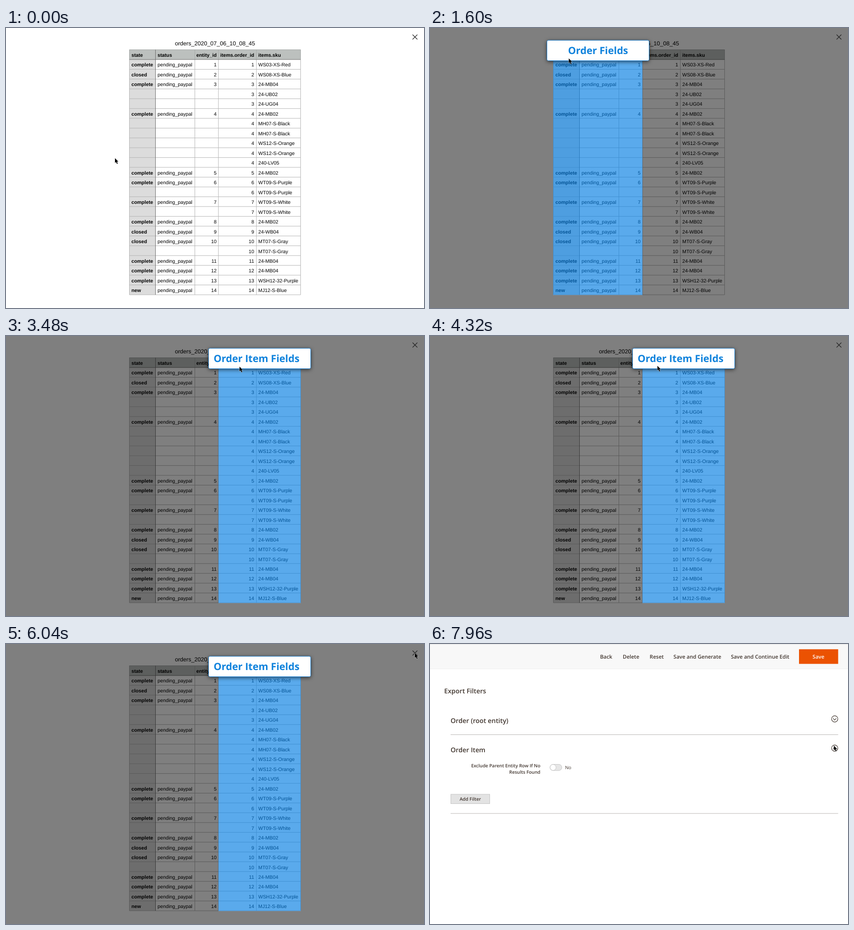
Recreate the animation shown at these times as an HTML page. Size 913 px wide and 613 px high, loop 8000 ms.

```html
<!DOCTYPE html>
<html lang="en">
<head>
<meta charset="utf-8">
<title>Order export</title>
<style>
html, body { margin: 0; width: 100%; height: 100%; overflow: hidden; background: #fff; }
svg { display: block; width: 913px; height: 613px; text-rendering: geometricPrecision; }
#table { font: 10.75px "Liberation Sans", Arial, sans-serif; fill: #000; }
#page { font: 600 11.5px "Open Sans", sans-serif; fill: #41362f; }
#labels { font: 700 21.7px "Open Sans", sans-serif; fill: #0f82dc; }
.b { font-weight: 700; }
.e { text-anchor: end; }
.m { text-anchor: middle; }
.h { font-size: 14.3px; }
.s { font-size: 10px; }
.line { fill: none; stroke: #b5b5b5; }
</style>
</head>
<body>
<svg viewBox="0 0 913 613">
  <g id="table"></g>
  <g id="labels"></g>
  <g id="page"></g>
  <g id="cursor">
    <path d="M0 0V10.3L2.4 8.2L4.2 12.5L6.1 11.7L4.3 7.5H7.4Z" fill="#000" stroke="#fff" stroke-width=".8" style="paint-order:stroke"/>
  </g>
</svg>
<script>
const $ = id => document.getElementById(id);
const text = (x, y, s, cls = '') => `<text x="${x}" y="${y}" class="${cls}">${s}</text>`;
const rect = (x, y, w, h, fill, more = '') =>
  `<rect x="${x}" y="${y}" width="${w}" height="${h}" fill="${fill}" ${more}/>`;
const path = (d, more) => `<path d="${d}" fill="none" ${more}/>`;

// Orders: state initial, then the item SKUs of each order
const orders = `c WS03-XS-Red|x WS08-XS-Blue|c 24-MB04 24-UB02 24-UG04
|c 24-MB02 MH07-S-Black MH07-S-Black WS12-S-Orange WS12-S-Orange 240-LV05
|c 24-MB02|c WT09-S-Purple WT09-S-Purple|c WT09-S-White WT09-S-White|c 24-MB02
|x 24-WB04|x MT07-S-Gray MT07-S-Gray|c 24-MB04|c 24-MB04|c WSH12-32-Purple|n MJ12-S-Blue`;
const states = { c: 'complete', x: 'closed', n: 'new' };
const cols = [269.5, 326.5, 412.5, 464, 547, 643.5];
const top0 = 69, rowH = 21.46, bottom = 584;

function drawTable() {
  let out = text(456.5, 38, 'orders_2020_07_06_10_08_45', 'm" style="font-size:12.55px');
  out += rect(269.5, 47.5, 374, 21.5, '#bcc0be') + rect(269.5, top0, 57, bottom - top0, '#dcdcdc');
  let d = '';
  for (let i = 1; i <= 24; i++) d += `M269.5 ${top0 + i * rowH}H643.5`;
  for (const x of cols) d += `M${x} ${top0}V${bottom}`;
  out += path(d, 'stroke="#b4b4b4"');
  out += path(cols.map(x => `M${x} 47.5V69`).join('') + 'M269.5 47.5H643.5', 'stroke="#a6a9a7"');
  out += path(`M269.5 69H643.5M326.5 47.5V${bottom}`, 'stroke="#6c6c6c"');
  out += text(274, 63, 'state', 'b') + text(331, 63, 'status', 'b') + text(460, 63, 'entity_id', 'b e')
    + text(542, 63, 'items.order_id', 'b e') + text(551, 63, 'items.sku', 'b');
  let y = 84.4;
  orders.split('|').forEach((order, n) => {
    const [state, ...skus] = order.trim().split(' ');
    out += text(274, y, states[state], 'b') + text(331, y, 'pending_paypal') + text(460, y, n + 1, 'e');
    for (const sku of skus) {
      out += text(542, y, n + 1, 'e') + text(551, y, sku);
      y += 21.48;
    }
  });
  $('table').innerHTML = out;
}

// Dims everything but one column group, which is tinted blue under a label
function label(id, x, w, boxX, title, titleX) {
  const hole = `M0 0H913V613H0ZM${x} 47V584.5H${x + w}V47Z`;
  return `<g id="${id}"><path d="${hole}" fill="#000" fill-opacity=".5" fill-rule="evenodd"/>`
    + rect(x, 47, w, 537.5, '#067ee2', 'fill-opacity=".66"')
    + rect(boxX, 27, 223, 44.5, '#fff', 'rx="3" stroke="#1a83da" style="filter:drop-shadow(0 2px 4px #0009)"')
    + text(titleX, 56.5, title) + '</g>';
}

const chevron = (y, up) => `<circle cx="884" cy="${y}" r="6.8" class="line" style="stroke:#41362f;stroke-width:1.2"/>`
  + path(`M880.5 ${y + up}l3.5 ${-3 * up}l3.5 ${3 * up}`, 'stroke="#41362f" stroke-width="1.2"');
const rule = y => path(`M45 ${y}H891.5`, 'stroke="#b8b5b3"');

function drawPage() {
  const buttons = [[384.8, 'Back'], [439, 'Delete'], [495.2, 'Reset'], [584, 'Save and Generate'], [721, 'Save and Continue Edit']];
  $('page').innerHTML = rect(0, 0, 913, 613, '#fff') + rect(0, 0, 913, 55, '#f8f8f8')
    + path('M0 .5H913', 'stroke="#e3e3e3"') + path('M0 54.5H913', 'stroke="#efefef"')
    + buttons.map(([x, s]) => text(x, 32, s, 'm')).join('')
    + rect(806, 11.5, 85.5, 32, '#eb5202') + text(848.5, 32, 'Save', 'm" fill="#fff')
    + text(31, 108.3, 'Export Filters', 'h') + text(45, 172.5, 'Order (root entity)', 'h')
    + text(45, 236.5, 'Order Item', 'h') + chevron(164, -1.3) + rule(198.5)
    + `<g id="closed">${chevron(228, -1.3)}${rule(262.5)}</g>`
    + `<g id="open">${chevron(228, 1.3)}${rule(371)}`
    + text(241, 270, 'Exclude Parent Entity Row If No', 's e') + text(241, 284, 'Results Found', 's e')
    + rect(262, 263.5, 26, 13.5, '#e6e6e6', 'rx="6.75" stroke="#b9b9b9" stroke-width=".8"')
    + '<circle cx="268.8" cy="270.2" r="6.5" fill="#fff" stroke="#b9b9b9" stroke-width=".8"/>'
    + text(295, 274, 'No', 's" font-weight="400')
    + rect(45.5, 329, 85, 20.5, '#e3e3e3', 'stroke="#c4c4c4"') + text(88, 343, 'Add Filter', 's m') + '</g>';
}

drawTable();
$('labels').innerHTML = label('first', 269, 195, 255.5, 'Order Fields', 301.5)
  + label('second', 464, 180, 442.5, 'Order Item Fields', 453.5);
drawPage();
$('labels').insertAdjacentHTML('beforeend',
  path('M888 14.5L898.5 25M898.5 14.5L888 25', 'stroke="#222" stroke-width="1.2"'));

// Cursor moves: start, end, target x, y, optional bend x, y
const moves = [
  [400, 1400, 303, 66.5], [1760, 2600, 431, 65.5], [2840, 3240, 510, 67],
  [3600, 4000, 461, 65.5], [4000, 4920, 621, 64.5], [5080, 6040, 893, 20],
  [6560, 7640, 882, 222.5, 868, 121]
];
const ease = p => p * p / (p * p + (1 - p) * (1 - p));

function cursorAt(t) {
  let x = 238, y = 285;
  for (const [start, end, tx, ty, bx = (x + tx) / 2, by = (y + ty) / 2] of moves) {
    if (t <= start) break;
    const p = ease(Math.min(1, (t - start) / (end - start))), q = 1 - p;
    x = q * q * x + 2 * p * q * bx + p * p * tx;
    y = q * q * y + 2 * p * q * by + p * p * ty;
  }
  return [x, y];
}

const show = (id, on) => $(id).style.display = on ? '' : 'none';

function frame(now) {
  const t = now % 8000;
  show('first', t >= 1600 && t < 3480);
  show('second', t >= 3480 && t < 6440);
  show('page', t >= 6440);
  show('closed', t < 7960);
  show('open', t >= 7960);
  $('cursor').setAttribute('transform', `translate(${cursorAt(t)})`);
  requestAnimationFrame(frame);
}
requestAnimationFrame(frame);
</script>
</body>
</html>
```
